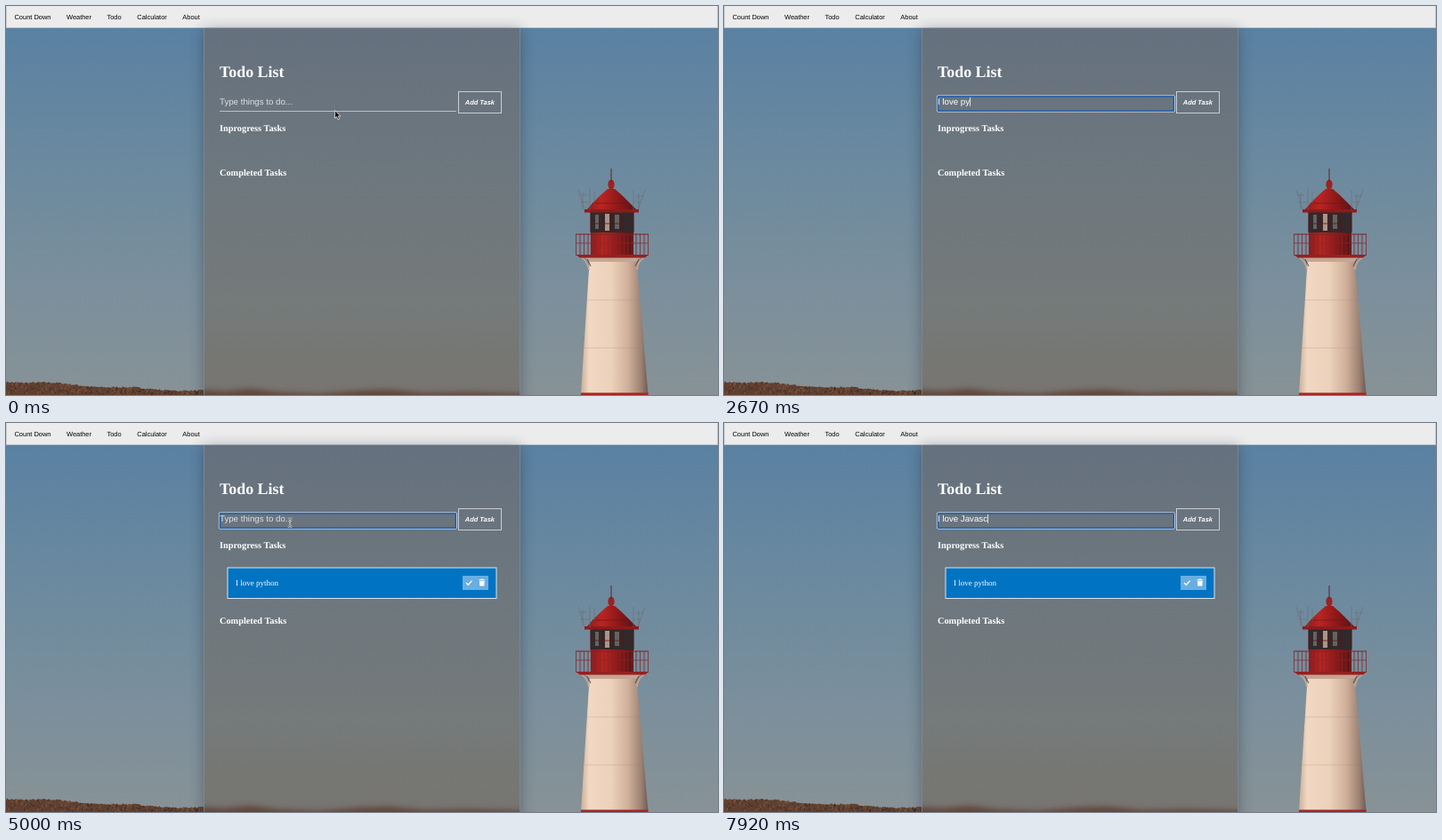
An HTML page that plays this animation: 800 by 438 pixels, repeating every 8 s.

```html
<!DOCTYPE html>
<html lang="en">
<head>
<meta charset="utf-8">
<title>Todo List</title>
<style>
html, body { margin: 0; width: 100%; height: 100%; overflow: hidden; }
svg { display: block; width: 800px; height: 438px; }
text { fill: #fff; white-space: pre; text-rendering: geometricPrecision; }
.sans { font-family: "Liberation Sans", Arial, sans-serif; }
.serif { font-family: "Liberation Serif", "Times New Roman", serif; }
.nav { font-size: 7.45px; fill: #000; }
.head { font-size: 10.3px; font-weight: bold; }
.field { font-size: 9.7px; }
</style>
</head>
<body>
<svg viewBox="0 0 800 438">
  <defs>
    <linearGradient id="sky" x2="0" y2="1">
      <stop stop-color="#5a81a2"/><stop offset=".35" stop-color="#6a899f"/>
      <stop offset=".7" stop-color="#7b8f9c"/><stop offset="1" stop-color="#879296"/>
    </linearGradient>
    <linearGradient id="glass" x2="0" y2="1">
      <stop stop-color="#65717e"/><stop offset=".4" stop-color="#6d777e"/>
      <stop offset=".75" stop-color="#757a7a"/><stop offset="1" stop-color="#777570"/>
    </linearGradient>
    <linearGradient id="wall">
      <stop stop-color="#cbae99"/><stop offset=".12" stop-color="#f1d8c2"/>
      <stop offset=".45" stop-color="#ecd1bb"/><stop offset=".7" stop-color="#d0b09b"/>
      <stop offset=".9" stop-color="#9c8071"/><stop offset="1" stop-color="#6d5a54"/>
    </linearGradient>
    <linearGradient id="red">
      <stop stop-color="#8f1a19"/><stop offset=".3" stop-color="#b92522"/>
      <stop offset=".65" stop-color="#8c1718"/><stop offset="1" stop-color="#531416"/>
    </linearGradient>
    <filter id="shade" x="-20%" width="140%"><feGaussianBlur stdDeviation="8"/></filter>
    <filter id="soft" x="-10%" y="-100%" width="120%" height="300%"><feGaussianBlur stdDeviation="3"/></filter>
    <clipPath id="paneClip"><rect x="222" y="25" width="356" height="413"/></clipPath>
  </defs>

  <rect y="24" width="800" height="414" fill="url(#sky)"/>
  <path id="dune" fill="#5f4030"/>
  <path id="blades" fill="none" stroke="#8d5b40" stroke-width=".7"/>
  <path id="shadows" fill="none" stroke="#3a2920" stroke-width=".7"/>

  <g id="lighthouse">
    <path d="M656 281H708L721.5 437H646Z" fill="url(#wall)"/>
    <path d="M646 435.5H721.5V438H646Z" fill="#a52423"/>
    <path d="M652 331H713M650 385H717" stroke="#a0816f" stroke-width=".6" opacity=".45"/>
    <path d="M650 283H713L708 288H656Z" fill="#c4a594"/>
    <path d="M646 283Q653 286 655 297M718 283Q710 286 709 297" fill="none" stroke="#c3a592" stroke-width="1.8"/>
    <path d="M653 285L657 293M711 285L707 293" stroke="#5f4b48" stroke-width="1"/>
    <path d="M657 254H705V283H657Z" fill="url(#red)"/>
    <path d="M657 232H705V255H657Z" fill="#302a2c"/>
    <path d="M662 235H666V251H662ZM684 235H689V251H684Z" fill="#66625f"/>
    <path d="M673 234H678V253H673Z" fill="#ac9585"/>
    <path d="M657 232V255M670 232V255M681 232V255M693 232V255M705 232V255" stroke="#521819" stroke-width="1.2"/>
    <path d="M657 245H705" stroke="#521b1c" stroke-width=".8"/>
    <path d="M652 230L659 222L668 213L676 206H684L692 213L701 222L709 230Z" fill="url(#red)"/>
    <path d="M650 229H711V232.5H650Z" fill="#8c1b1b"/>
    <path d="M659 222H701" stroke="#6b1618" stroke-width=".7"/>
    <ellipse cx="680" cy="201" rx="3.6" ry="5.5" fill="#9d2221"/>
    <path d="M680 183V198" stroke="#54272b"/>
    <path d="M643 207L650 229M648 210V229M656 206V230M661 209V223M705 207V230M711 211V229M718 207L710 229M644 213H652M708 214H717M645 221H655M705 221H714" fill="none" stroke="#6d6c70" stroke-width=".6"/>
    <path id="rails" fill="none" stroke="#822729" stroke-width=".8"/>
    <path d="M640 257H722" stroke="#7c2325" stroke-width="1.1"/>
    <path d="M640 267H722" stroke="#8f2527" stroke-width=".7"/>
    <path d="M640 280H722L718 283.5H645Z" fill="#96201f"/>
  </g>

  <rect width="800" height="24.5" fill="#ececec"/>
  <path d="M0 24.5H800" stroke="#bfc3c7" stroke-width=".6"/>
  <path d="M.3 0V24M799.5 0V24" stroke="#aaa" stroke-width=".6"/>

  <rect x="222" y="27" width="356" height="430" fill="#1c2c3a" opacity=".42" filter="url(#shade)"/>
  <rect x="222" y="25" width="356" height="413" fill="url(#glass)"/>
  <g clip-path="url(#paneClip)">
    <path d="M215 432L245 434L275 431L305 435L350 437L400 433L430 432L470 436L520 435L590 437V450H215Z" fill="#60443a" filter="url(#soft)"/>
  </g>
  <path d="M222.5 25V438M577.5 25V438" stroke="#838e97" stroke-width=".7"/>
  <g id="menu"></g>

  <text class="serif" x="240" y="80" font-size="17.9" font-weight="bold">Todo List</text>
  <rect x="508.5" y="96.5" width="48" height="24" fill="none" stroke="#d3d8db" stroke-width=".9"/>
  <text class="sans" x="515.8" y="111" font-size="7.45" font-weight="bold" font-style="italic">Add Task</text>
  <path id="underline" d="M240 118.5H506" stroke="#c4cacf" stroke-width=".9"/>
  <g id="ring" fill="none">
    <rect x="239.4" y="100.9" width="267" height="18.2" rx="1.2" stroke="#dfe8f0" stroke-width=".9"/>
    <rect x="240.4" y="101.9" width="265" height="16.2" rx=".6" stroke="#1059b4" stroke-width="1.3"/>
  </g>
  <text id="hint" class="sans field" x="240" y="111" style="fill:#dde0e3">Type things to do...</text>
  <text id="typed" class="sans field" x="240" y="111"></text>
  <path id="caret" d="M.5 102.8V112.8" stroke="#fff" stroke-width=".8"/>

  <text class="serif head" x="240" y="141">Inprogress Tasks</text>
  <g id="task">
    <rect x="249" y="163" width="302" height="34.5" fill="#0074c2" stroke="#e9f2f9" stroke-width=".9"/>
    <text class="serif" x="258" y="183" font-size="9">I love python</text>
    <rect x="513" y="172" width="29" height="16" fill="#69aee0"/>
    <path d="M517 180L519.3 182.3L523.6 177.6" fill="none" stroke="#fff" stroke-width="1.3"/>
    <path d="M531.4 176.2H533.4L534 175.5H535.6L536.2 176.2H538.2V177.3H531.4ZM531.9 178H537.7L537.3 183.6H532.3Z" fill="#fff"/>
  </g>
  <text id="done" class="serif head" x="240" y="191">Completed Tasks</text>

  <path id="arrow" d="M0 0V8.8L2 7L3.5 10.2L5.1 9.5L3.7 6.4H6.4Z" fill="#111" stroke="#fff" stroke-width=".7"/>
  <g id="beam" fill="none">
    <path d="M-2.3 -4.7Q0 -4.7 0 -3Q0 -4.7 2.3 -4.7M0 -3V3M-2.3 4.7Q0 4.7 0 3Q0 4.7 2.3 4.7" stroke="#f2f2f2" stroke-width="1.8"/>
    <path d="M-2.3 -4.7Q0 -4.7 0 -3Q0 -4.7 2.3 -4.7M0 -3V3M-2.3 4.7Q0 4.7 0 3Q0 4.7 2.3 4.7" stroke="#343b43" stroke-width=".7"/>
  </g>
</svg>
<script>
const LOOP = 8000, FOCUS = 500, SUBMIT = 3670;
const $ = id => document.getElementById(id);
const show = (id, on) => $(id).setAttribute('visibility', on ? 'visible' : 'hidden');

// [start, time per key, keys]
const typing = [
  [920, 209, 'I love python'],
  [5340, 160, 'I love '],
  [6700, 220, 'Javasc']
];
// [time, x, y]
const pointerIn = [[0, 369.5, 117.6], [250, 369, 113], [420, 368, 109]];
const pointerBack = [[4500, 335, 113], [4900, 319, 112]];

let seed = 7;
const random = () => (seed = seed * 16807 % 2147483647) / 2147483647;

function drawGrass() {
  const ridge = x => 424.5 + x * .047 + Math.sin(x / 13) * .8 - 1.5 * Math.exp(-(((x - 40) / 30) ** 2));
  let dune = 'M0 438', light = '', dark = '';
  for (let x = 0; x <= 222; x += 1.5) {
    dune += `L${x} ${ridge(x) - random() * 2}`;
  }
  for (let i = 0; i < 300; i++) {
    const x = random() * 222, y = ridge(x) + 1 + random() * (437 - ridge(x));
    const blade = `M${x} ${y}l${random() * 4 - 2} ${-1 - random() * 2}`;
    if (i % 2) light += blade; else dark += blade;
  }
  $('dune').setAttribute('d', dune + 'V438Z');
  $('blades').setAttribute('d', light);
  $('shadows').setAttribute('d', dark);
}

function drawRails() {
  let d = '';
  for (let x = 640.5; x < 723; x += 4.5) d += `M${x} 257V281`;
  $('rails').setAttribute('d', d);
}

function drawMenu() {
  const items = { 'Count Down': 9.5, Weather: 68, Todo: 113.5, Calculator: 147.3, About: 198.3 };
  $('menu').innerHTML = Object.entries(items)
    .map(([name, x]) => `<text class="sans nav" x="${x}" y="14.6">${name}</text>`).join('');
}

function along(steps, t) {
  let [from, to] = [steps[0], steps[0]];
  for (const step of steps) {
    from = to;
    to = step;
    if (t < step[0]) break;
  }
  const p = Math.min(1, Math.max(0, (t - from[0]) / (to[0] - from[0] || 1)));
  return [1, 2].map(i => from[i] + (to[i] - from[i]) * p);
}

function textAt(t) {
  const current = t < SUBMIT ? typing.slice(0, 1) : typing.slice(1);
  return current.map(([start, pace, keys]) =>
    keys.slice(0, Math.max(0, Math.floor((t - start) / pace) + 1))).join('');
}

function render(t) {
  const text = textAt(t), focused = t >= FOCUS, added = t >= SUBMIT;
  show('ring', focused);
  show('underline', !focused);
  show('hint', !text);
  show('task', added);
  $('done').setAttribute('y', added ? 226 : 191);

  if ($('typed').textContent !== text) $('typed').textContent = text;
  const width = text ? $('typed').getComputedTextLength() : 0;
  $('caret').setAttribute('transform', `translate(${240 + width} 0)`);
  show('caret', text || (focused && t < 920));

  const arriving = t < 920, returning = t >= 4500 && t < 5340;
  const [x, y] = along(arriving ? pointerIn : pointerBack, t);
  for (const id of ['arrow', 'beam']) $(id).setAttribute('transform', `translate(${x} ${y})`);
  show('arrow', t < 250);
  show('beam', (arriving && t >= 250) || returning);
}

drawGrass();
drawRails();
drawMenu();
const begin = performance.now();
function tick() {
  render((performance.now() - begin) % LOOP);
  requestAnimationFrame(tick);
}
tick();
</script>
</body>
</html>
```
